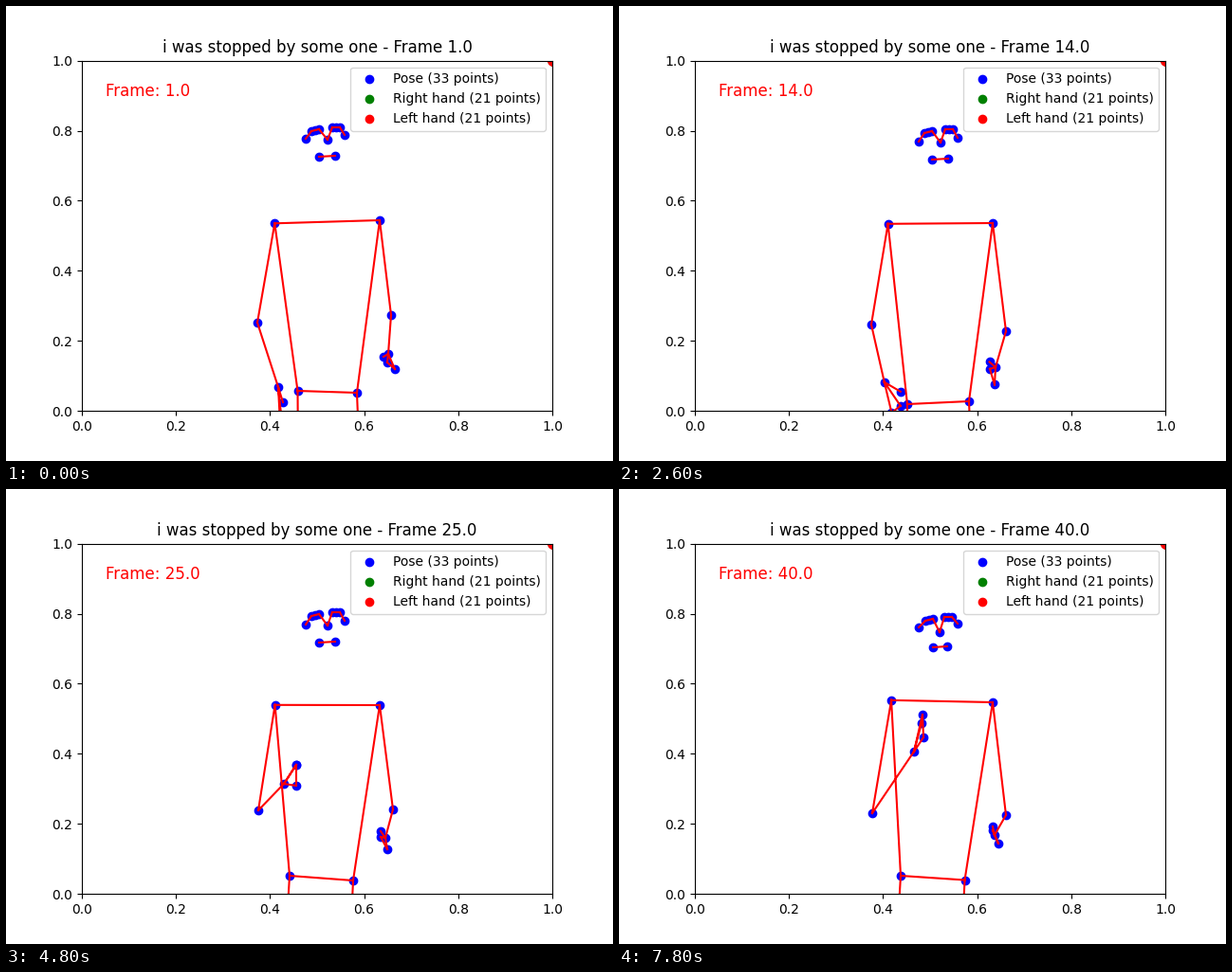
Recreate the animation shown at these times as a matplotlib script. Size 640 by 480 pixels, loop 8 s.

```python
import numpy as np
import matplotlib.pyplot as plt
from matplotlib.animation import FuncAnimation

W, H, DPI = 640, 480, 100
FRAMES, INTERVAL = 40, 200
t = np.arange(1, FRAMES + 1)


def ramp(start, end):
    return np.clip((t - start) / (end - start), 0, 1)


def smooth(start, end):
    s = ramp(start, end)
    return s * s * (3 - 2 * s)


# how far each stage of the gesture has come, per frame
STAGES = dict(settle=smooth(1, 9), drift=ramp(9, 18), lift=smooth(18, 25),
              bend=smooth(25, 31), dip=smooth(31, 34), sweep=smooth(34, 40),
              late=ramp(25, 40))


def joint(x, y, base=0, **moves):
    """A point, relative to base, shifted a little in each named stage."""
    path = np.tile([float(x), float(y)], (FRAMES, 1)) + base
    for stage, shift in moves.items():
        path += np.outer(STAGES[stage], shift)
    return path


def make_face():
    """Ear, eye, nose, eye, ear and the two mouth corners, nodding together."""
    ears, nose, mouth = [(316, 140), (357, 136)], (339, 141), [(330, 159), (347, 158)]
    eyes = [(x, 132 - i) for i, x in enumerate((322, 326, 330))]
    eyes_2 = [(x, 128) for x in (344, 348, 352)]
    points = [ears[0], *eyes, nose, *eyes_2, ears[1], *mouth]
    depth = [3, 5, 5, 5, 7, 5, 5, 5, 3, 5, 5]  # the nose leads, the ears lag
    lean = [0, 1, 1, 1, -1, -1, -1, -1, 0, 1, -1]
    return [joint(x, y, settle=(0, 2 if p in eyes + eyes_2 else 3), bend=(dx, dy))
            for p, dx, dy in zip(points, lean, depth) for x, y in [p]]


def make_left():
    wrist = joint(287, 402, settle=(-10, -8), drift=(5, 5), lift=(11, -88),
                  bend=(-12, -29), dip=(3, 7), sweep=(27, -12))
    hand = joint(0, 0, wrist, dip=(-2, 5), sweep=(4, -7))
    hip = joint(307.5, 406, settle=(-3, 14), drift=(-1, 0), lift=(-4.5, -12), late=(-2, 0))
    return [
        joint(283.3, 229.3, settle=(0.3, 0.5), lift=(0, -2), late=(3.5, -5)),
        joint(265, 334, settle=(1, 2), lift=(0, 3), late=(1, 3)),
        wrist,
        joint(2, 38, hand, settle=(9, -4), drift=(-6, -3), lift=(8, -29), bend=(-5, -15)),
        joint(4, 38, hand, settle=(13, -13), lift=(-4, -45), bend=(-6, -17)),
        joint(5, 16, hand, settle=(12, -6), lift=(-4, -30), bend=(-7, -8)),
        hip,
        joint(1, 150, hip, settle=(-1, 0), lift=(-9, 0)),
    ]


def make_right():
    wrist = joint(403, 367, settle=(-6, 13), drift=(0, 2), lift=(3, -14), late=(-4, -3))
    hand = joint(0, 0, wrist, lift=(1, -4), late=(2, -3))
    hip = joint(370, 408, settle=(-1, 9), lift=(-3, -4), late=(-1.5, -0.5))
    return [
        joint(394, 226, settle=(0, 3), lift=(0, -1), late=(0, -3)),
        joint(406, 326, settle=(2, 16), drift=(0, 2), lift=(0, -6), late=(0, 6)),
        wrist,
        joint(7, 16, hand, settle=(-8, 4), drift=(0, -3), lift=(2, -1)),
        joint(-1, 9, hand, settle=(-5, -9), drift=(0, 3), late=(1, -1)),
        joint(-5, 3, hand, settle=(-2, -12), drift=(1, 6), late=(1, 1)),
        hip,
        joint(6, 150, hip, lift=(-13, 0)),
    ]


joints = np.stack(make_face() + make_left() + make_right(), axis=1)
joints = (joints - [80, 427.2]) / [496, -369.6]

# shoulder, elbow, wrist, pinky, index, thumb, hip, knee on each side
L, R = 11, 19
SIDE = [(0, 1), (1, 2), (2, 3), (2, 4), (2, 5), (3, 4), (0, 6), (6, 7)]
BONES = [(i, i + 1) for i in range(8)] + [(9, 10), (L, R), (L + 6, R + 6)]
BONES += [(o + a, o + b) for o in (L, R) for a, b in SIDE]

fig, ax = plt.subplots(figsize=(W / DPI, H / DPI), dpi=DPI)
corner = np.ones(21)  # undetected hands rest in the corner
pose = ax.scatter(*joints[0].T, c="blue", label="Pose (33 points)")
ax.scatter(corner, corner, c="green", label="Right hand (21 points)")
ax.scatter(corner, corner, c="red", label="Left hand (21 points)")
bones, = ax.plot([], [], "r-")
label = ax.text(0.05, 0.9, "", color="red", fontsize=12)
title = ax.set_title("")
ax.set_xlim(0, 1)
ax.set_ylim(0, 1)
ax.legend(loc="upper right")


def update(i):
    p = joints[i]
    pose.set_offsets(p)
    segs = np.full((len(BONES), 3, 2), np.nan)
    segs[:, :2] = p[np.array(BONES)]
    bones.set_data(*segs.reshape(-1, 2).T)
    number = float(i + 1)
    label.set_text(f"Frame: {number}")
    title.set_text(f"i was stopped by some one - Frame {number}")
    return pose, bones, label, title


anim = FuncAnimation(fig, update, frames=FRAMES, interval=INTERVAL,
                     init_func=lambda: update(0), repeat=True, repeat_delay=0)
plt.show()
```
